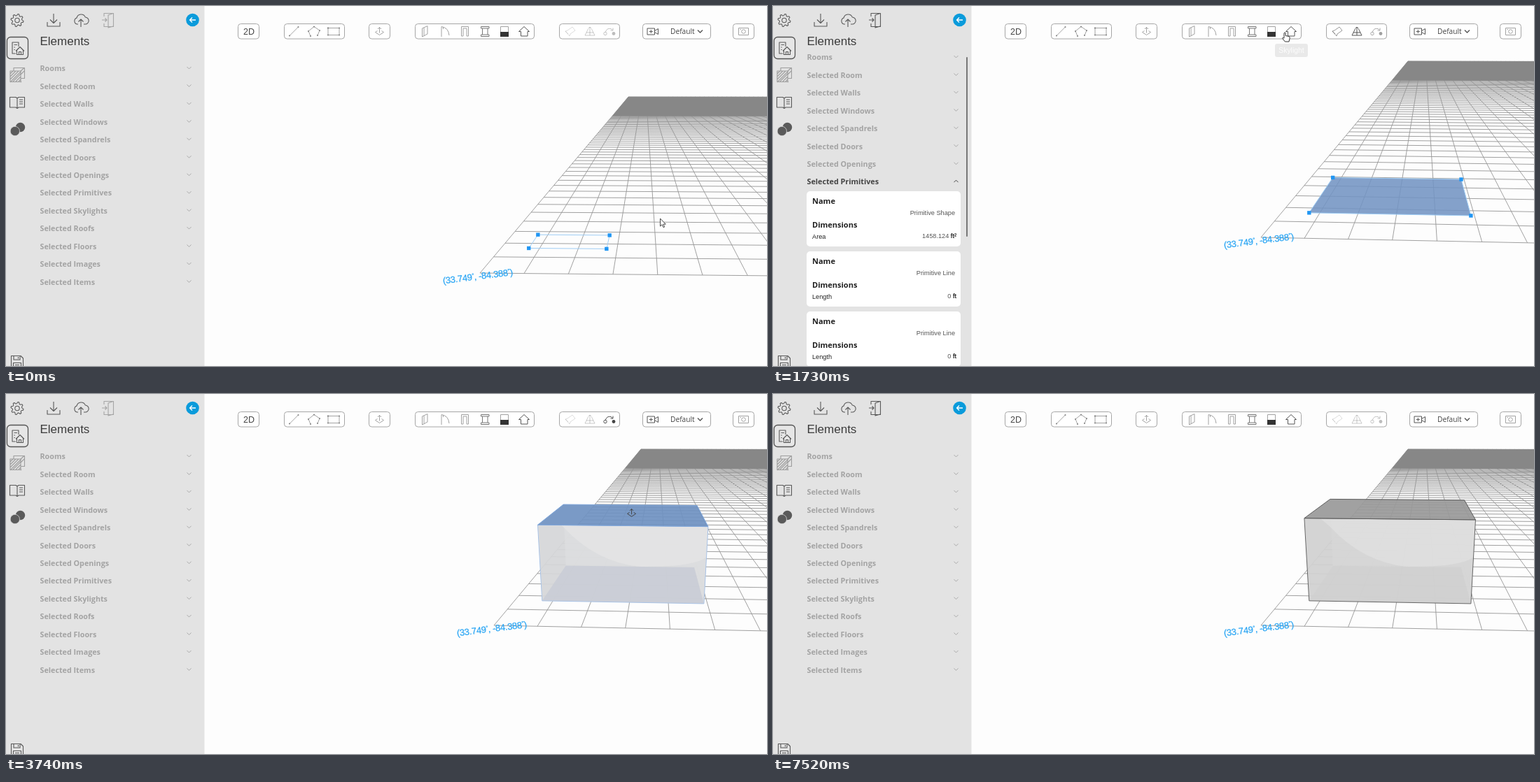
An HTML page for the animation above (8000 ms loop, 1087 by 515 pixels).

```html
<!DOCTYPE html>
<html lang="en">
<head>
<meta charset="utf-8">
<title>Extrude a primitive</title>
<style>
html,body{margin:0;width:100%;height:100%;overflow:hidden;background:#fdfdfd}
svg{display:block;width:1087px;height:515px}
text{font-family:"Liberation Sans",Arial,sans-serif}
.b{font-family:"Open Sans","Noto Sans",sans-serif;font-weight:700}
.i{fill:none;stroke:#5a5a5a;stroke-width:1.1;stroke-linejoin:round}
.t{fill:none;stroke:#a2a2a2;stroke-width:1}
.d{fill:none;stroke:#555;stroke-width:1}
</style>
</head>
<body>
<svg id="stage" viewBox="0 0 1087 515" xmlns="http://www.w3.org/2000/svg"></svg>
<script>
const stage = document.getElementById('stage');
const LOOP = 8000;

// Each camera: grid origin, horizon height, two vanishing points and the step of one cell across.
const CAM_A = {x: 677, y: 382, horizon: 102, depthX: 912.6, sideX: -29000, cell: -.00212};
const CAM_B = {x: 697, y: 331, horizon: 51, depthX: 930.3, sideX: -13000, cell: -.004506};
const NADIR = {x: 885, y: 2340, rise: -.0625};

const ROWS = ['Rooms', ...'Room,Walls,Windows,Spandrels,Doors,Openings,Primitives,Skylights,Roofs,Floors,Images,Items'
  .split(',').map(s => 'Selected ' + s)];
const OPEN = 7, GAP = 25.45, CARDS = 432;

const mix = (a, b, k) => Array.isArray(a) ? a.map((v, i) => mix(v, b[i], k)) : a + (b - a) * k;
const span = (t, a, b) => Math.min(1, Math.max(0, (t - a) / (b - a)));
const smooth = k => k * k * (3 - 2 * k);
const within = (t, a, b) => t >= a && t < b;
const range = n => [...Array(n).keys()];
const pts = q => q.map(p => p.map(v => v.toFixed(2)).join()).join(' ');
const el = id => document.getElementById(id);
const set = (id, o) => { for (const k in o) el(id).setAttribute(k, o[k]); };
const show = (id, on) => set(id, {visibility: on ? 'visible' : 'hidden'});

// Ground cell (i across, k deep) at height h, seen by camera c.
function project(c, i, k, h = 0) {
  const u = k / 11.1, v = i * c.cell, z = h * NADIR.rise, w = 1 + u + v + z;
  return [(c.x + u * c.depthX + v * c.sideX + z * NADIR.x) / w,
    (c.y + (u + v) * c.horizon + z * NADIR.y) / w];
}

// Corners in order: front left, back left, back right, front right.
const rect = (c, [i0, k0], [i1, k1], h) =>
  [[i0, k0], [i0, k1], [i1, k1], [i1, k0]].map(([i, k]) => project(c, i, k, h));

function gridPath(c) {
  const line = (...p) => `M${p.map(([i, k]) => pts([project(c, i, k)])).join('L')}`;
  return range(101).map(k => line([0, k], [44, k])).join('') + range(45).map(i => line([i, 0], [i, 100])).join('');
}

const path = (d, cls = 't', more = '') => `<path class="${cls}" d="${d}" ${more}/>`;
const text = (x, y, s, size, fill, more = '') => `<text x="${x}" y="${y}" font-size="${size}" fill="${fill}" ${more}>${s}</text>`;
const box = (x0, x1, id = '') => `<rect ${id && `id="${id}"`} x="${x0 + .5}" y="25.5" width="${x1 - x0 - 1}" height="21.5" rx="4" fill="#fff" stroke="#a6a6a6"/>`;
const nodes = (...p) => path('M' + p.join('L')) + p.map(([x, y]) => `<circle cx="${x}" cy="${y}" r="1.1" fill="#888"/>`).join('');
const extrude = 'M-6 1L0 5 6 1 3 -1M-3 -1L-6 1M0 2V-6M-2.5 -3.5L0 -6 2.5 -3.5';

function gear() {
  const rim = range(32).map(n => {
    const r = n % 4 < 2 ? 9 : 6.8, a = (n + .5) * Math.PI / 16;
    return [16 + r * Math.cos(a), 20.5 + r * Math.sin(a)];
  });
  return `<polygon class="i" points="${pts(rim)}"/><circle cx="16" cy="20.5" r="3.2" class="i"/>`;
}

function hatch() {
  const strokes = range(4).map(n => `M6 ${97 + 4 * n}L${10 + 4 * n} 93M${10 + 4 * n} 108L21 ${97 + 4 * n}`).join('');
  return path('M6 93H21V108.5H6ZM11 93V88.5H26.5V103.5H21M21 93L26 88.5M21 98L26 93' + strokes, 'i', 'opacity=".5"');
}

function card(n) {
  const y = 265 + 86 * n, shape = n === 0;
  return `<rect x="48" y="${y}" width="220" height="79" rx="5" fill="#fff"/>`
    + text(56, y + 17.5, 'Name', 11, '#222', 'class="b"')
    + text(260, y + 33.5, shape ? 'Primitive Shape' : 'Primitive Line', 9.2, '#555', 'text-anchor="end"')
    + text(56, y + 52, 'Dimensions', 11, '#222', 'class="b"')
    + text(56, y + 68, shape ? 'Area' : 'Length', 9.2, '#222')
    + text(262, y + 66.5, `${shape ? '1458.124' : '0'} <tspan fill="#111" stroke="#111" stroke-width=".2">${shape ? 'ft²' : 'ft'}</tspan>`, 9.2, '#555', 'text-anchor="end"');
}

function row(name, n) {
  return `<g id="row${n}">${text(48.5, 3.8, name, 10.75, '#a3a3a3', `class="b" id="name${n}"`)}`
    + path('M-3 -1.5L0 1.5 3 -1.5', 'd', `id="chev${n}" transform="translate(261.5 -1)" style="stroke:#aaa"`) + '</g>';
}

function sidebar() {
  return `<rect width="283.5" height="515" fill="#e3e3e3"/>` + gear()
    + `<rect x="1.5" y="44.5" width="30" height="31" rx="5" fill="#e6e6e6" stroke="#555" stroke-width="1.3"/>`
    + path('M14 68H9V52H18V58M11.5 55.5H16M11.5 59H13M11.5 62.5H13M14 64.5L20 58.5 26 64.5M15.5 63V69.5H24.5V63M18.5 69V65.5H21.5V69', 'i')
    + hatch()
    + path('M16 131V146M5.5 130.5H14L16 132 18 130.5H26.5V145H18L16 146.5 14 145H5.5ZM19 134H24M19 137H24M19 140H24', 'i')
    + `<circle cx="20.5" cy="173.5" r="6.7" fill="#5a5a5a"/><circle cx="12.8" cy="179" r="6.7" fill="#5a5a5a" stroke="#e3e3e3" stroke-width=".7"/>`
    + path('M7.5 520V500.5H21L24.5 504V520M11 500.5V506H20V500.5M17.5 502V504.5M10.5 520V510.5H21.5V520M13 513.5H19', 'i')
    + path('M68 11V24M63 19.5L68 24.5 73 19.5M59 23V29H77V23', 'i')
    + path('M103 26H101.5A4.7 4.7 0 0 1 101 17A6.5 6.5 0 0 1 113.3 16A5 5 0 0 1 113 26H111M107 30V19M103.5 22.5L107 19 110.5 22.5', 'i')
    + path('M140 15V10.5H153.5V29.5H140V25M153 10.5L146 13V31L153 29M137 20H144M141.5 17.5L144 20 141.5 22.5', 'i', 'id="exit"')
    + `<circle cx="266.5" cy="20" r="9.3" fill="#0a9bdb"/>`
    + path('M271 20H262.5M266 16.5L262.5 20 266 23.5', 'i', 'style="stroke:#fff;stroke-width:1.4"')
    + text(48.5, 56, 'Elements', 17, '#3c3c3c')
    + `<g clip-path="url(#listClip)">${ROWS.map(row).join('')}`
    + `<g id="cards"><g clip-path="url(#cardClip)">${range(5).map(card).join('')}</g></g></g>`
    + `<rect id="bar" x="276" y="73" width="2" height="257" rx="1" fill="#777"/>`;
}

function toolbar() {
  return box(331, 362) + box(397, 484) + box(518, 549, 'btn') + box(584, 755) + box(790, 877) + box(909, 1007) + box(1038, 1069)
    + text(347, 41, '2D', 12.5, '#444', 'text-anchor="middle"')
    + nodes([405, 42.5], [417.5, 30])
    + nodes([435, 43], [432, 36], [440, 29.5], [448, 35], [445, 42])
    + nodes([460, 31.5], [476, 31.5], [476, 41.5], [460, 41.5], [460, 31.5])
    + path(extrude, 't', 'transform="translate(533.5 36.5)"')
    + path('M594.5 32L602 28.5V40L594.5 44ZM597 31V42.5')
    + path('M622 44V29.5Q632 31 633 42M624.5 30V33')
    + path('M650.5 43V29.5H660.5V43H658V32H653V43Z')
    + path('M678.5 29.5H690V32H678.5ZM680.5 32V41M688 32V41M678.5 41H690V43.5H678.5Z', 'd', 'style="stroke:#777"')
    + path('M706.5 29.5H717.5V43H706.5Z') + `<rect x="706" y="37" width="12" height="7" fill="#333"/>`
    + path('M732.5 36.5L740 29.5 747.5 36.5H745V43H735.5V36.5Z', 'd')
    + path('M799 36L805 43 806 40 813 35 809 30 802 35ZM799 36L803 40', 'd', 'id="toolA"')
    + path('M831.5 33L827 42H841L836.5 33M829 38H839M834 42V30M831.5 32.5L834 30 836.5 32.5', 'd', 'id="toolB"')
    + `<g id="toolC">${path('M856 38Q858 31 864 32.5L867 35M867 31.5V35H863.5', 'd')}<circle cx="856" cy="39.5" r="2.2" class="d"/><circle cx="868" cy="39.5" r="2.4" fill="#444"/></g>`
    + path('M916 32H926.5V41H916ZM926.5 35.5L931.5 32.5V40.5L926.5 37.5M921.3 34V39M918.8 36.5H923.8', 'd')
    + text(949, 40.3, 'Default', 10.2, '#444', 'style="font-family:\'Open Sans\',sans-serif"')
    + path('M988 34.5L991.5 38 995 34.5', 'd', 'style="stroke-width:1.4"')
    + path('M1046.5 31.5H1060.5V41.5H1046.5ZM1048.5 33.5H1050') + `<circle cx="1053.5" cy="36.5" r="2.8" class="t"/>`;
}

const degree = '<tspan font-size="8" dy="-4">°</tspan>';
stage.innerHTML = `<defs>
  <clipPath id="listClip"><rect y="66" width="283" height="449"/></clipPath>
  <clipPath id="cardClip"><rect id="cardRect" x="40" y="263" width="236" height="0"/></clipPath>
  <clipPath id="frontClip"><polygon id="frontShape"/></clipPath></defs>
<rect width="1087" height="515" fill="#fdfdfd"/>
<path id="grid" fill="none" stroke="#969696" stroke-width=".9"/>
<polygon id="far" fill="#878787"/>
<g id="label">${text(0, 0, `(33.749${degree}<tspan dy="4">, -84.388</tspan>${degree}<tspan dy="4">)</tspan>`, 13, '#2ba6f4', 'letter-spacing="-.3" stroke="#2ba6f4" stroke-width=".25"')}</g>
<polygon id="floor"/>
<g id="handles">${range(4).map(n => `<rect id="h${n}" width="5.4" height="5.4" fill="#2196f3"/>`).join('')}</g>
<g id="solid">
  <polygon id="front" opacity=".93"/>
  <g clip-path="url(#frontClip)">
    <polygon id="inner" opacity=".8"/>
    <path id="lit" d="M782 178L797 191Q842 240 905 247Q985 248 1002 232L1006 150H770Z" opacity=".75"/>
    <polygon id="ground"/>
  </g>
  <polygon id="edge" fill="none"/>
  <polygon id="roof" fill-opacity=".92"/>
</g>
${toolbar()}
<g id="tip"><rect id="tipBox" y="54" height="19" rx="3" fill="#444"/><text id="tipText" y="67" font-size="10.4" fill="#fff" text-anchor="middle"></text></g>
${sidebar()}
<g id="cursor">
  <path id="arrow" d="M0 0V11L2.6 8.7 4.5 12.7 6.2 12 4.4 8.1H7.8Z" fill="#fff" stroke="#333" stroke-width=".9"/>
  <path id="hand" d="M-1 8V1.2Q0 -.6 1.2 1.2V5L6 6Q7.4 6.4 7.2 8.4L6 13.5H.4L-3.4 8.8Q-3.6 7 -1 8.6Z" fill="#fff" stroke="#333"/>
  <path id="push" d="${extrude}" fill="none" stroke="#444"/>
</g>`;

for (const c of [CAM_A, CAM_B]) c.grid = gridPath(c);

const height = t => smooth(span(t, 3160, 3860));

function panel(t) {
  const p = t < 2590 ? smooth(span(t, 1130, 1430)) : 0, open = p > 0;
  ROWS.forEach((_, n) => {
    const y = 89.5 + GAP * n - 16 * p + (n > OPEN ? CARDS * p : 0);
    set('row' + n, {transform: `translate(0 ${y.toFixed(2)})`});
  });
  set('name' + OPEN, {fill: open ? '#444' : '#a3a3a3'});
  set('chev' + OPEN, {
    style: `stroke:${open || within(t, 1000, 1140) ? '#444' : '#aaa'}`,
    transform: `translate(261.5 -1)${open ? ' scale(1 -1)' : ''}`
  });
  set('cards', {transform: `translate(0 ${16 * (1 - p)})`});
  set('cardRect', {height: CARDS * p});
  show('bar', p > .6);
}

function scene(t) {
  const cam = t < 1000 ? CAM_A : CAM_B, h = height(t), gray = t >= 4580;
  set('grid', {d: cam.grid});
  set('far', {points: pts(rect(cam, [0, 45], [44, 100]))});
  set('label', {transform: `translate(${cam.x - 52.5} ${cam.y + 15.5}) rotate(-7.2)`});

  const near = [.72, 1.63], drag = mix([2.73, 2.72], [4.91, 4.92], smooth(span(t, 150, 600)));
  const base = rect(cam, near, drag), top = rect(cam, near, drag, h);
  set('floor', {points: pts(base), fill: t < 690 ? 'none' : '#7394c3', 'fill-opacity': .88, stroke: '#9fcdf5'});
  base.forEach(([x, y], n) => set('h' + n, {x: x - 2.7, y: y - 2.7}));
  show('floor', !h);
  show('handles', !h);
  show('solid', h > 0);

  const front = pts([top[0], top[3], base[3], base[0]]);
  set('front', {points: front, fill: gray ? '#d1d1d1' : '#d5d7d9'});
  set('frontShape', {points: front});
  set('edge', {points: front, stroke: gray ? '#666' : '#a9c3e6'});
  set('inner', {points: pts([top[1], base[1], base[2], base[3], top[3]]), fill: gray ? '#d8d8d8' : '#dedfe0'});
  set('lit', {fill: gray ? '#e1e1e1' : '#e6e6e6'});
  set('ground', {points: pts(base), fill: gray ? '#d0d0d0' : '#c9cdd6', opacity: gray ? .6 : .85});
  set('roof', {points: pts(top), fill: gray ? '#999' : '#6f92c2', stroke: gray ? '#5c5c5c' : '#7fa6da'});
}

function tools(t) {
  const picked = within(t, 1140, 3160), pulling = within(t, 3160, 4580), over = within(t, 2130, 2730);
  set('exit', {opacity: t < 690 || within(t, 3160, 4160) ? .45 : 1});
  set('toolA', {opacity: picked ? .6 : .2});
  set('toolB', {opacity: picked ? 1 : .3});
  set('toolC', {opacity: pulling ? 1 : picked ? .5 : .35});
  set('btn', {fill: over ? '#e4e9ee' : '#fff', stroke: over ? '#9fb2c4' : '#a6a6a6'});

  const sky = t < 2000, w = sky ? 47 : 84, x = sky ? 740.5 : 533;
  set('tip', {opacity: within(t, 1710, 1850) || within(t, 2130, 2280) ? .1 : within(t, 2280, 2590) ? .9 : 0});
  set('tipBox', {x: x - w / 2, width: w});
  set('tipText', {x});
  el('tipText').textContent = sky ? 'Skylight' : 'Extrude Primitive';
}

function pointerAt(t) {
  const house = [731, 37.5], button = [545, 37.5], away = [1095, 545], rest = [910, 247];
  const roof = project(CAM_B, 2.95, 3.45, height(t));
  if (t < 1000) return mix([934.5, 304], [963, 297], smooth(span(t, 150, 690)));
  if (t < 1730) return mix([909, 316], house, smooth(span(t, 1000, 1710)));
  if (t < 2590) return mix(house, button, smooth(span(t, 1730, 2130)));
  if (t < 4430) return mix(button, roof, smooth(span(t, 2590, 3160)));
  if (t < 5250) return mix(roof, away, smooth(span(t, 4430, 5030)));
  return mix(mix(away, rest, smooth(span(t, 5400, 6070))), [906, 245], span(t, 6370, 6800));
}

function pointer(t) {
  const hand = within(t, 1570, 2730), push = t >= 3020;
  set('cursor', {transform: `translate(${pointerAt(t)})`});
  show('hand', hand);
  show('push', push && t < 7520);
  show('arrow', !hand && !push);
}

const start = performance.now();
function tick() {
  const t = (performance.now() - start) % LOOP;
  for (const update of [panel, scene, tools, pointer]) update(t);
  requestAnimationFrame(tick);
}
tick();
</script>
</body>
</html>
```
